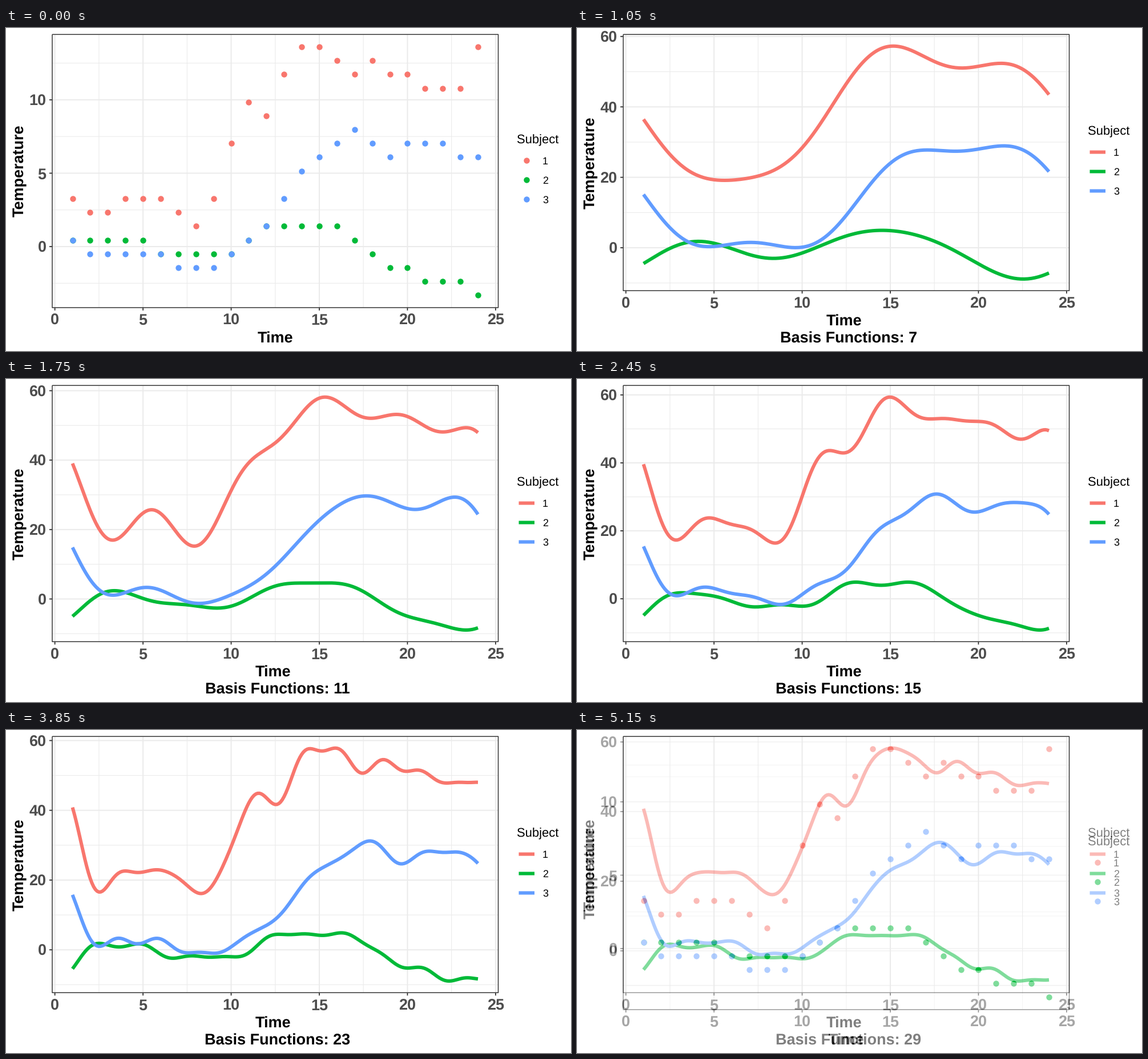
Recreate the animation shown at these times as a matplotlib script. Size 990 by 566 pixels, loop 5250 ms.

```python
import numpy as np
import matplotlib.pyplot as plt
from matplotlib.animation import FuncAnimation

W, H, DPI = 990, 566, 100
PT = 72 / DPI
LEFT, RIGHT, TOP = 81, 862.5, 11.3
COLORS = ["#F8766D", "#00BA38", "#619CFF"]
GRID, EDGE, LABEL = "#EBEBEB", "#333333", "#4D4D4D"
FONT = 27
STEP_MS, HOLD, SCENE = 50, 5, 7  # ticks of 50 ms: still part and full scene
SCENES = 15

# Hourly readings as whole steps above a base value
HOURS = np.arange(1, 25)
LEVELS = np.array([
    [3, 2, 2, 3, 3, 3, 2, 1, 3, 7, 10, 9, 12, 14, 14, 13, 12, 13, 12, 12, 11, 11, 11, 14],
    [0, 0, 0, 0, 0, -1, -1, -1, -1, -1, 0, 1, 1, 1, 1, 1, 0, -1, -2, -2, -3, -3, -3, -4],
    [0, -1, -1, -1, -1, -1, -2, -2, -2, -1, 0, 1, 3, 5, 6, 7, 8, 7, 6, 7, 7, 7, 6, 6],
])
TEMPS = 0.447 + 0.94 * LEVELS

plt.rcParams["font.family"] = "Liberation Sans"
plt.rcParams["text.hinting"] = "no_hinting"

fig = plt.figure(figsize=(W / DPI, H / DPI), dpi=DPI, facecolor="white")
ax = fig.add_axes([0, 0, 1, 1])


def reset_stage():
    ax.clear()
    ax.set_xlim(0, W)
    ax.set_ylim(H, 0)
    ax.axis("off")


def fourier(t, count, period):
    cols = [np.ones_like(t, dtype=float)]
    for k in range(1, count // 2 + 1):
        w = 2 * np.pi * k / period
        cols += [np.sin(w * t), np.cos(w * t)]
    return np.stack(cols, axis=1)


def smooth(t, count):
    """Curves of all subjects from a lightly penalised Fourier fit."""
    period = 23
    norm = np.full(count, np.sqrt(period / 2))
    norm[0] = np.sqrt(period)
    phi = fourier(HOURS, count, period) / norm
    order = (np.arange(count) + 1) // 2
    rough = np.diag((2 * np.pi * order / period) ** 4)
    coef = np.linalg.solve(phi.T @ phi + 1e-9 * rough, phi.T @ TEMPS.T)
    return (fourier(t, count, 24) @ coef).T


def line(x, y, color, width, z):
    ax.plot(x, y, color=color, lw=width * PT, zorder=z, snap=False,
            solid_capstyle="butt", solid_joinstyle="round")


def dots(x, y, color, z):
    ax.plot(x, y, "o", color=color, ms=10.4 * PT, mew=0, zorder=z)


def text(x, y, s, size=FONT, color="black", ha="center", weight="bold", **kw):
    ax.text(x, y, s, fontsize=size * PT, color=color, ha=ha,
            va=kw.pop("va", "baseline"), weight=weight, zorder=9, **kw)


def x_pix(t):
    return LEFT + (t + 0.15) / 25.3 * (RIGHT - LEFT)


def panel(bottom, low, high, step):
    """Grid, border, ticks and tick labels; returns the y mapping."""
    pad = 0.05 * (high - low)
    low, high = low - pad, high + pad

    def y_pix(v):
        return bottom - (v - low) / (high - low) * (bottom - TOP)

    for i in range(11):
        x, major = x_pix(2.5 * i), i % 2 == 0
        line([x, x], [TOP, bottom], GRID, 2 if major else 1.1, 2 if major else 1)
        if major:
            line([x, x], [bottom, bottom + 5], EDGE, 1.8, 6)
            text(x, bottom + 30, f"{5 * i // 2}", color=LABEL)
    half = step / 2
    for i in range(int(np.ceil(low / half)), int(high // half) + 1):
        y, major = y_pix(i * half), i % 2 == 0
        line([LEFT, RIGHT], [y, y], GRID, 2 if major else 1.1, 2 if major else 1)
        if major:
            line([LEFT - 5, LEFT], [y, y], EDGE, 1.8, 6)
            text(70.5, y + 10, f"{i // 2 * step}", color=LABEL, ha="right")
    line([LEFT, RIGHT, RIGHT, LEFT, LEFT], [TOP, TOP, bottom, bottom, TOP],
         EDGE, 1.5, 5)
    text(31, (TOP + bottom) / 2, "Temperature", rotation=90,
         rotation_mode="anchor", va="baseline")
    return y_pix


def legend(top, key):
    text(895.5, top, "Subject", 22, ha="left", weight="normal")
    for i, color in enumerate(COLORS):
        y = top + 30 + 34 * i
        key(y, color)
        text(940, y + 6.6, str(i + 1), 18, ha="left", weight="normal")


def draw_points():
    y_pix = panel(490, TEMPS.min(), TEMPS.max(), 5)
    for z, (row, color) in enumerate(zip(TEMPS, COLORS)):
        dots(x_pix(HOURS), y_pix(row), color, 3 + z / 10)
    legend(202.3, lambda y, c: dots([912], [y], c, 3))
    text(471.7, 551, "Time")


def draw_curves(count):
    t = np.linspace(1, 24, 231)
    curves = smooth(t, count)
    y_pix = panel(460.3, curves.min(), curves.max(), 20)
    for z, (row, color) in enumerate(zip(curves, COLORS)):
        line(x_pix(t), y_pix(row), color, 6, 3 + z / 10)
    legend(187.5, lambda y, c: line([898.5, 926], [y, y], c, 6, 3))
    text(468, 521, "Time")
    text(475.6, 551, f"Basis Functions: {count}")


def render(scene):
    reset_stage()
    if scene == 0:
        draw_points()
    else:
        draw_curves(2 * scene + 1)
    fig.canvas.draw()
    return np.asarray(fig.canvas.buffer_rgba())[..., :3] / 255.0


views = [render(s) for s in range(SCENES)]
reset_stage()
screen = ax.imshow(views[0], extent=(0, W, H, 0), aspect="auto",
                   interpolation="nearest")


def update(i):
    scene, tick = divmod(i, SCENE)
    view = views[scene]
    if tick >= HOLD:
        view = (view + views[(scene + 1) % SCENES]) / 2
    screen.set_data(view)
    return [screen]


anim = FuncAnimation(fig, update, frames=SCENES * SCENE, interval=STEP_MS,
                     repeat=True, repeat_delay=0)
plt.show()
```
